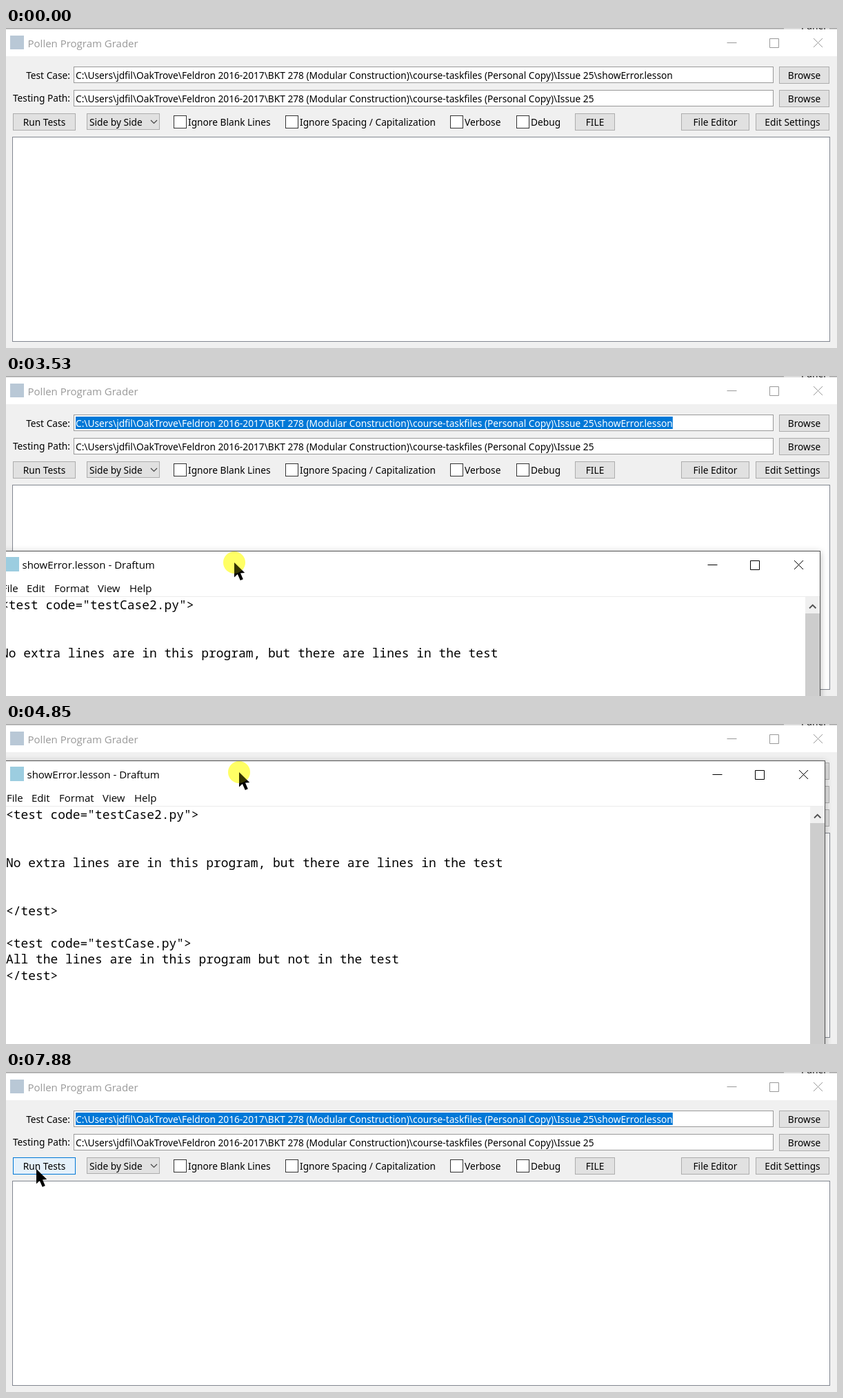
Write an HTML page that moves like this. It is 1205x465 px and loops after 8000 ms.

```html
<!DOCTYPE html>
<html lang="en">
<head>
<meta charset="utf-8">
<title>Program grader</title>
<style>
  html, body { margin: 0; width: 100%; height: 100%; overflow: hidden; background: #f0f0f0; }
  svg { display: block; width: 100vw; height: 100vh; }
  text { white-space: pre; }
  .ui { font: 13.72px "Noto Sans", sans-serif; }
  .title { font: 15px "Open Sans", sans-serif; }
  .code { font: 17.93px "Noto Sans Mono", monospace; }
  .icons { fill: none; stroke: currentColor; }
  #main { color: #999; }
  #main.active { color: #000; }
  #main .title { fill: currentColor; }
  .hover rect { fill: #e5f1fb; stroke: #0078d7; }
  #pad { filter: drop-shadow(0 2px 5px rgba(0, 0, 0, .3)); }
</style>
</head>
<body>
<svg id="stage" viewBox="0 0 1205 465"></svg>
<script>
const LOOP = 8000;
const FILE_NAME = 'showError.lesson';
const FOLDER = 'C:\\Users\\jdfil\\OakTrove\\Feldron 2016-2017\\BKT 278 (Modular Construction)' +
  '\\course-taskfiles (Personal Copy)\\Issue 25';
const FILE_PATH = FOLDER + '\\' + FILE_NAME;
const GRAB = { x: 343, y: 17 };
const CODE = [
  [0, '<test code="testCase2.py">'],
  [3, 'No extra lines are in this program, but there are lines in the test'],
  [6, '</test>'],
  [8, '<test code="testCase.py">'],
  [9, 'All the lines are in this program but not in the test'],
  [10, '</test>']
];

const escape = s => s.replace(/</g, '&lt;');
const text = (x, y, s, cls = 'ui', extra = '') =>
  `<text x="${x}" y="${y}" class="${cls}" ${extra}>${escape(s)}</text>`;
const fill = (x, y, w, h, color, extra = '') =>
  `<rect x="${x}" y="${y}" width="${w}" height="${h}" fill="${color}" ${extra}/>`;
const box = (x, y, w, h, color, stroke) =>
  fill(x + .5, y + .5, w - 1, h - 1, color, `stroke="${stroke}"`);
const button = (x, y, w, h, label, id = '') =>
  `<g id="${id}">${box(x, y, w, h, '#e1e1e1', '#adadad')}` +
  text(x + w / 2, y + 17.5, label, 'ui', 'text-anchor="middle"') + '</g>';
const checkbox = (x, label) => box(x, 127, 19, 19, '#fff', '#333') + text(x + 21, 141.5, label);
const field = (y, value) => box(98, y, 1015, 24, '#fff', '#999') + text(101, y + 17.5, value);
const label = (y, s) => text(93, y, s, 'ui', 'text-anchor="end"');
const windowIcons = (x, y) => `<path class="icons" transform="translate(${x} ${y})"
  d="M1029.5 20.5h14M1091.5 14.5h13v13h-13zM1155 14l13 13M1168 14l-13 13"/>`;

const mainWindow = `
  ${fill(0, 0, 1205, 465, '#f0f0f0')}
  ${fill(0, 0, 1205, 41, '#fff')}
  ${fill(0, 0, 1205, 1.7, '#a8a8a8')}
  ${fill(1128, 0, 66, 2, '#dcdcdc')}
  ${text(1153, 1.5, 'Panel', 'ui', 'fill="#222"')}
  <g id="main">
    ${fill(6, 11, 20, 20, '#b9c8d6')}
    ${text(31.5, 27.5, 'Pollen Program Grader', 'title')}
    ${windowIcons(16, 1)}
  </g>
  ${label(73.5, 'Test Case:')}${field(56, FILE_PATH)}${button(1121, 56, 73, 25, 'Browse')}
  ${label(106.5, 'Testing Path:')}${field(90, FOLDER)}${button(1121, 90, 73, 25, 'Browse')}
  ${button(10, 124, 91, 25, 'Run Tests', 'run')}
  ${box(117, 124, 106, 24, '#e1e1e1', '#adadad')}${text(121, 141.5, 'Side by Side')}
  <path d="M210 134l4.5 4.5 4.5-4.5" fill="none" stroke="#444" stroke-width="1.2"/>
  ${checkbox(243, 'Ignore Blank Lines')}
  ${checkbox(405, 'Ignore Spacing / Capitalization')}
  ${checkbox(644, 'Verbose')}
  ${checkbox(740, 'Debug')}
  ${button(825, 124, 58, 25, 'FILE')}
  ${button(979, 124, 99, 25, 'File Editor')}
  ${button(1087, 124, 107, 25, 'Edit Settings', 'settings')}
  ${box(9, 158, 1186, 298, '#fff', '#828790')}
  <clipPath id="selClip">${fill(0, 56, 1113, 24, '#000', 'id="selEdge"')}</clipPath>
  <g id="selection" clip-path="url(#selClip)">
    ${fill(101, 59, 870, 18, '#0078d7', 'id="selBack"')}
    ${text(101, 73.5, FILE_PATH, 'ui', 'id="selText" fill="#fff"')}
  </g>
  ${fill(101, 59, 1, 18, '#000', 'id="fieldCaret"')}`;

const menu = [[6, 'File'], [42, 'Edit'], [82, 'Format'], [145, 'View'], [191, 'Help']];
const padWindow = `<g id="pad">
  ${box(0, 0, 1193, 700, '#fff', '#555')}
  ${fill(11, 9, 20, 21, '#9ccde0')}
  ${text(35.5, 26, FILE_NAME + ' - Draftum', 'title')}
  ${windowIcons(0, 0)}
  ${menu.map(([x, s]) => text(x, 59.5, s, 'title')).join('')}
  ${fill(1, 66, 1191, 1, '#ececec')}
  ${fill(1171, 67, 21, 632, '#f0f0f0')}
  ${fill(1171, 91, 21, 600, '#cdcdcd')}
  <path d="M1177 83.5l4.700-4.700 4.700 4.700" fill="none" stroke="#505050" stroke-width="1.800"/>
  ${CODE.map(([row, s]) => text(5, 84.5 + row * 23.4, s, 'code')).join('')}
  ${fill(5, 183, 1, 24, '#000', 'id="padCaret"')}
</g>`;

const pointer = `<g id="pointer">
  <g class="halo"><circle r="16" fill="#ff0" opacity=".5"/></g>
  <path id="arrow" d="M0 0V21.500L4.800 17 8.800 26 12.800 24.300 9 15.500 15.200 15Z"/>
  <path id="beam" d="M-4-9.500H-1L0-8.500 1-9.500H4M0-8.500V8.500M-4 9.500H-1L0 8.500 1 9.500H4" fill="none" stroke="#000"/>
  <g class="halo"><circle r="16" fill="#ff0" opacity=".2"/></g>
</g>`;

document.getElementById('stage').innerHTML = mainWindow + padWindow + pointer;

// Each move: first tick, last tick, tick count, end of hold, and a path of [tick, x, y].
const mouseMoves = [
  [70, 750, 10, 980, [[0, 1140, 431], [4, 1125, 290], [7, 1100, 137], [9, 1048, 65]]],
  [980, 1360, 6, 1760, [[0, 1048, 67], [1, 960, 67], [3, 330, 66], [4, 130, 65], [5, 72, 64]]],
  [1760, 1990, 4, 1990, [[0, 110, 118], [1, 172, 230], [3, 310, 480]]],
  [7040, 7800, 11, 7880, [[0, 232, 359], [3, 200, 300], [6, 120, 200], [8, 70, 155], [10, 46, 139]]],
  [7880, 7880, 1, LOOP, [[0, 44, 141]]]
];
const padMoves = [
  [3070, 3840, 11, 3920, [[0, -14, 450], [3, -14, 345], [6, -12, 254], [10, 2, 155]]],
  [3920, 4530, 9, 5400, [[0, 5, 137], [4, 12, 85], [6, 4, 62], [8, -5, 53]]],
  [5400, 6180, 11, 6260, [[0, -5, 55], [2, -4, 72], [4, -1.5, 110], [6, -4, 180], [10, -10, 354]]],
  [6260, 6410, 3, 6410, [[0, -11, 394], [2, -12, 475]]]
];

function locate(moves, t) {
  const move = moves.find(m => t >= m[0] && t < m[3]);
  if (!move) return null;
  const [start, end, count, , path] = move;
  const step = (end - start) / (count - 1) || 1;
  const tick = Math.min(count - 1, Math.floor((t - start) / step + .15));
  const next = path.findIndex(p => p[0] >= tick);
  const b = path[next], a = path[next - 1] || b;
  const f = (tick - a[0]) / (b[0] - a[0] || 1);
  return { x: a[1] + (b[1] - a[1]) * f, y: a[2] + (b[2] - a[2]) * f };
}

const $ = id => document.getElementById(id);
const halos = document.querySelectorAll('.halo');
const show = (el, on) => { el.style.display = on ? '' : 'none'; };
const place = (el, p) => el.setAttribute('transform', `translate(${p.x} ${p.y})`);
const between = (t, ...spans) => spans.some(([a, b]) => t >= a && t < b);
const inside = (p, x, y, w, h) => !!p && p.x >= x && p.x < x + w && p.y >= y && p.y < y + h;

$('selBack').setAttribute('width', $('selText').getComputedTextLength());

function render(t) {
  const pad = locate(padMoves, t);
  const mouse = pad ? { x: pad.x + GRAB.x, y: pad.y + GRAB.y } : locate(mouseMoves, t);
  const selecting = between(t, [980, 1590]);

  show($('pad'), pad);
  if (pad) place($('pad'), pad);
  show($('padCaret'), between(t, [3260, 3790], [4320, 4850], [5380, 5910]));

  show($('pointer'), mouse);
  if (mouse) place($('pointer'), mouse);
  const beam = selecting || (!pad && (inside(mouse, 98, 56, 1015, 24) || inside(mouse, 98, 90, 1015, 24)));
  show($('beam'), beam);
  show($('arrow'), !beam);
  halos.forEach(h => show(h, pad || selecting));

  $('main').classList.toggle('active', between(t, [980, 2670]));
  $('run').classList.toggle('hover', !pad && inside(mouse, 10, 124, 91, 25));
  $('settings').classList.toggle('hover', !pad && inside(mouse, 1087, 124, 107, 25));
  show($('selection'), t >= 980);
  $('selEdge').setAttribute('x', selecting ? mouse.x : 0);
  show($('fieldCaret'), between(t, [1360, 1760], [2220, 2670]));
}

const begin = performance.now();
function frame() {
  render((performance.now() - begin) % LOOP);
  requestAnimationFrame(frame);
}
render(0);
requestAnimationFrame(frame);
</script>
</body>
</html>
```
